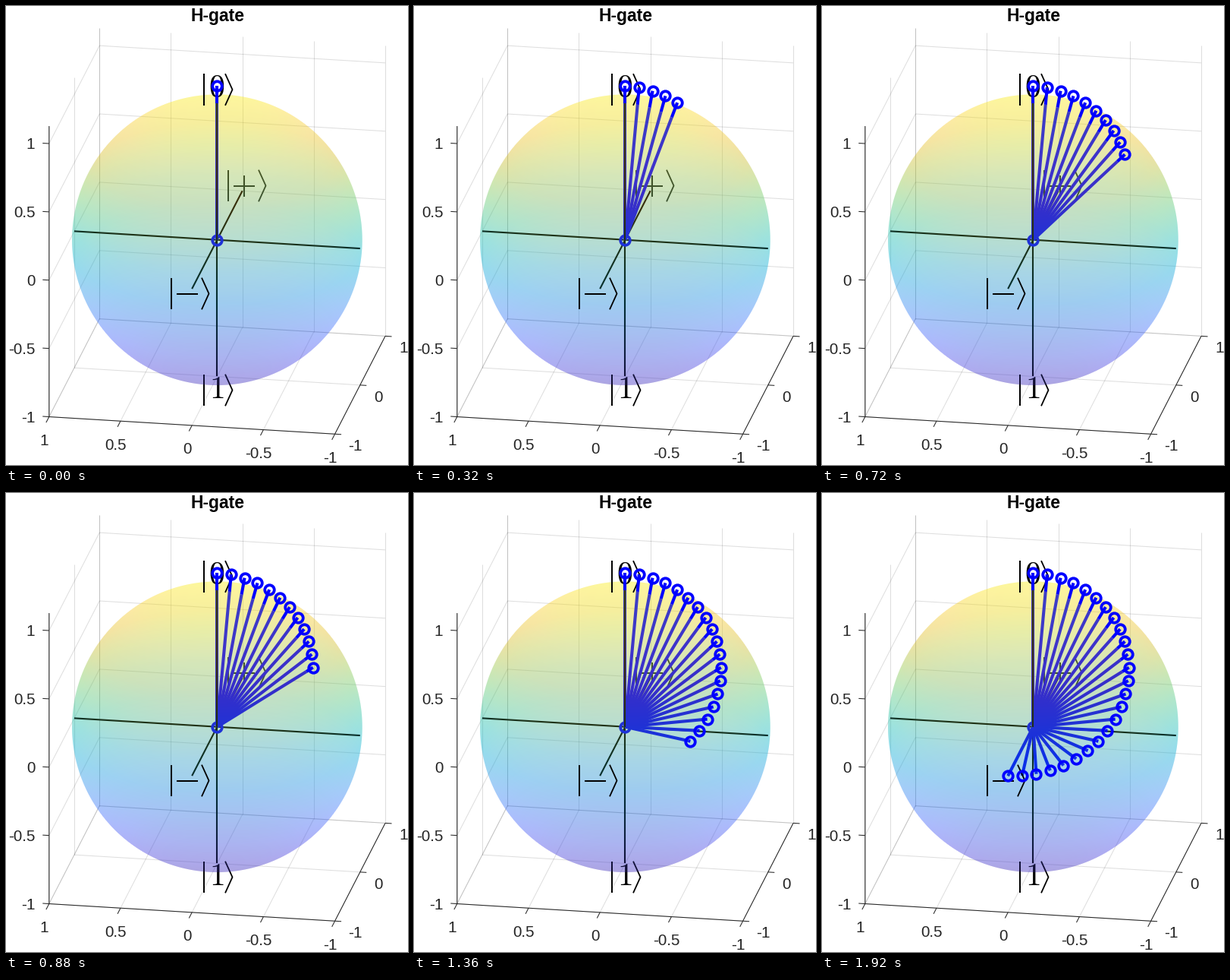
Animation, 530 px wide and 604 px high, one loop 2000 ms. Source, as a matplotlib script:

```python
import numpy as np
import matplotlib.pyplot as plt
from matplotlib.animation import FuncAnimation

W, H = 530, 604
N = 25
PX = 0.72            # points per pixel at 100 dpi
ALPHA = 0.25
INK = (0.15, 0.15, 0.15)
BLUE = (0, 0, 1)

# Orthographic camera: screen vectors of the data axes
RADIUS = 191.3
AZ, EL = np.radians(10), np.radians(20)
O = np.array([278.4, 307.7])
EX = RADIUS * np.array([np.sin(AZ), -np.cos(AZ) * np.sin(EL)])
EY = RADIUS * np.array([-np.cos(AZ), -np.sin(AZ) * np.sin(EL)])
EZ = RADIUS * np.array([0, -np.cos(EL)])
ZTOP = 1.128

PARULA = np.array([
    (.242, .150, .660), (.280, .278, .922), (.244, .436, .999),
    (.154, .590, .922), (.030, .708, .816), (.194, .776, .625),
    (.504, .799, .348), (.863, .741, .160), (.989, .814, .189),
    (.977, .984, .081)])

fig = plt.figure(figsize=(W / 100, H / 100), dpi=100, facecolor="white")
ax = fig.add_axes([0, 0, 1, 1])
ax.set_xlim(0, W)
ax.set_ylim(H, 0)
ax.axis("off")


def project(x, y, z):
    return O + x * EX + y * EY + z * EZ


def stroke(*pts, color="black", width=1.04, z=1, **kw):
    xs, ys = zip(*pts)
    kw.setdefault("solid_capstyle", "butt")
    return ax.plot(xs, ys, color=color, lw=width * PX, zorder=z, **kw)[0]


def label(x, y, s, size=20.8, ha="center", **kw):
    ax.text(x, y + 0.357 * size, s, fontsize=size * PX, ha=ha,
            va="baseline", family="Liberation Sans", **kw)


def grid_line(a, b):
    stroke(project(*a), project(*b), color=INK, alpha=0.15, z=0)


def tick(p, direction):
    stroke(p, p + 8.5 * direction / np.hypot(*direction), color=INK)


def draw_box():
    steps = (-1, -0.5, 0, 0.5, 1)
    for v in steps:
        grid_line((1, v, -1), (1, v, ZTOP))
        grid_line((1, -1, v), (1, 1, v))
        grid_line((-1, 1, v), (1, 1, v))
        grid_line((-1, v, -1), (1, v, -1))
    for v in (-1, 0, 1):
        grid_line((v, 1, -1), (v, 1, ZTOP))
        grid_line((v, -1, -1), (v, 1, -1))

    left, right = project(-1, 1, -1), project(-1, -1, -1)
    stroke(project(-1, 1, ZTOP), left, right, project(1, -1, -1), color=INK)
    for v in steps:
        p = project(-1, 1, v)
        tick(p, EY)
        label(38.5, p[1], f"{v:g}", ha="right", color=INK)
        p = project(-1, v, -1)
        tick(p, -EX)
        label(p[0] - 6.5, p[1] + 30, f"{v:g}", color=INK)
    for v in (-1, 0, 1):
        p = project(v, -1, -1)
        tick(p, -EY)
        label(p[0] + (26.5 if v < 0 else 24), p[1] + 14.5, f"{v:g}",
              color=INK)


def sphere_half(side, z):
    yy, xx = np.mgrid[0:H, 0:W] + 0.5
    sx, sy = (xx - O[0]) / RADIUS, (O[1] - yy) / RADIUS
    r2 = sx**2 + sy**2
    depth = np.sqrt(np.clip(1 - r2, 0, 1))
    height = sy * np.cos(EL) + side * depth * np.sin(EL)
    t, stops = (height + 1) / 2, np.linspace(0, 1, len(PARULA))
    rgba = np.empty((H, W, 4))
    for c in range(3):
        rgba[..., c] = np.interp(t, stops, PARULA[:, c])
    rgba[..., 3] = ALPHA * np.clip(RADIUS * (1 - np.sqrt(r2)) + 0.5, 0, 1)
    ax.imshow(rgba, extent=(0, W, H, 0), zorder=z,
              interpolation="nearest", aspect="auto")


def ket(x, y, sym, z):
    """Dirac ket with its bar at x, centred vertically on y."""
    em = 41.7
    mid = x + (16.7 if sym in "01" else 21.5)
    end = x + (28 if sym in "01" else 40.5)
    stroke((x, y - em / 2), (x, y + em / 2), width=2, z=z)
    stroke((end, y - em / 2), (end + 9.5, y), (end, y + em / 2),
           width=1.8, z=z)
    if sym in "01":
        ax.text(mid, y + em / 4, f"${sym}$", fontsize=em * PX, ha="center",
                va="baseline", math_fontfamily="cm", zorder=z)
    else:
        stroke((mid - 14, y), (mid + 14, y), width=2, z=z)
        if sym == "+":
            stroke((mid, y - 14), (mid, y + 14), width=2, z=z)


def ring(p, z):
    return ax.plot(*p, "o", ms=12.5 * PX, mfc="none", mec=BLUE,
                   mew=3.8 * PX, zorder=z)[0]


def state_vector(k):
    """Half turn on a circle from the top to the minus state."""
    a = np.pi * k / (N - 1)
    r = np.hypot(0.5, ZTOP / 2)
    u = np.cos(a)
    v = np.array([-0.5 + 0.5 * u, -r * np.sin(a), ZTOP / 2 * (1 + u)])
    tip, exit_pt = project(*v), project(*(v / np.linalg.norm(v)))
    return [stroke(O, exit_pt, color=BLUE, width=4.1, z=5),
            stroke(exit_pt, tip, color=BLUE, width=4.1, z=10),
            ring(tip, 10)]


draw_box()
label(278.7, 12.3, "H-gate", size=22.9, weight="bold")

ket(292.5, 236.5, "+", 2)
sphere_half(-1, 3)
stroke(project(-1, 0, 0), project(1, 0, 0), width=2.1, z=4)
stroke(project(0, -1, 0), project(0, 1, 0), width=2.1, z=4)
stroke(O, project(0, 0, -1), width=2.1, z=4)
ring(O, 5)
stroke(O, project(0, 0, 1), width=2.1, z=6)
ket(261, 505.5, "1", 6)
sphere_half(1, 7)
ket(261, 110, "0", 8)
ket(217.5, 378.5, "-", 8)

vectors = [state_vector(k) for k in range(N)]


def update(i):
    for k, parts in enumerate(vectors):
        for part in parts:
            part.set_visible(k <= i)
    return [part for parts in vectors for part in parts]


anim = FuncAnimation(fig, update, frames=N, interval=80, repeat=True,
                     repeat_delay=0, blit=False)
plt.show()
```
